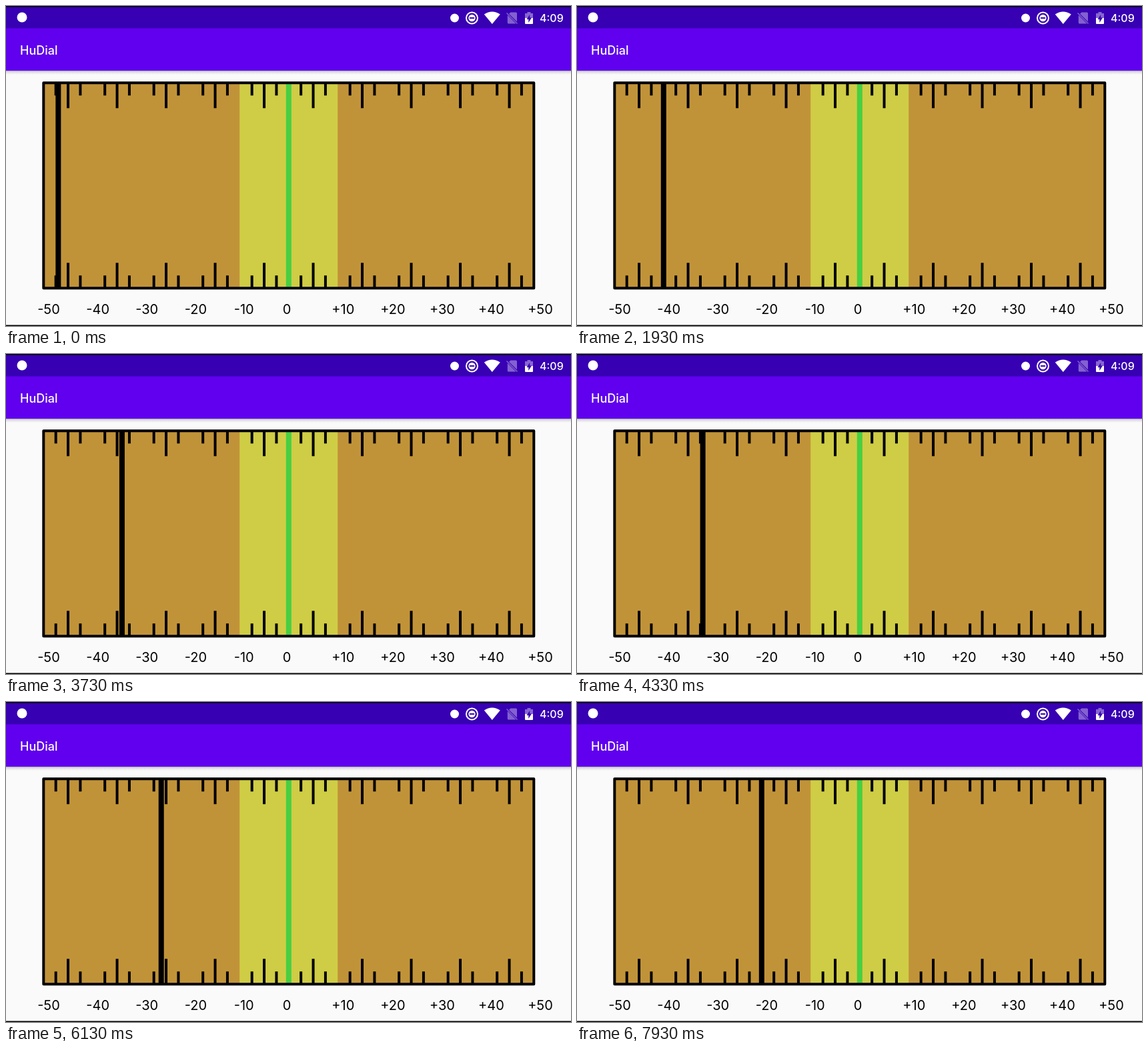
Recreate the animation shown at these times as an HTML page. Size 847 px wide and 480 px high, loop 8 s.

```html
<!DOCTYPE html>
<html lang="en">
<head>
<meta charset="utf-8">
<title>Gauge</title>
<style>
html, body { margin: 0; width: 100%; height: 100%; overflow: hidden; background: #fafafa; }
svg { display: block; width: 847px; height: 480px; }
text { font-family: Inter, sans-serif; }
.bar { font-weight: 500; fill: #fff; }
</style>
</head>
<body>
<svg viewBox="0 0 847 480">
  <defs>
    <linearGradient id="shadow" x2="0" y2="1">
      <stop stop-color="#b4b4b6"/>
      <stop offset=".4" stop-color="#e2e2e2"/>
      <stop offset="1" stop-color="#fafafa"/>
    </linearGradient>
  </defs>
  <rect width="847" height="480" fill="#fafafa"/>
  <rect y="97" width="847" height="6" fill="url(#shadow)"/>
  <rect y="33" width="847" height="64" fill="#6000ee"/>
  <rect width="847" height="33.5" fill="#3700b3"/>
  <path d="M0 .7H847M0 479.2H847" stroke="#000" stroke-width="1.6"/>

  <g fill="#fff">
    <circle cx="24" cy="17" r="7.5"/>
    <circle cx="672.5" cy="18" r="6.5"/>
    <circle cx="698.5" cy="18" r="8.5" fill="none" stroke="#fff" stroke-width="2"/>
    <path d="M698.5 12.8a5.2 5.2 0 0 1 0 10.4a5.2 5.2 0 0 1 0-10.4zM695 17v2h7v-2z" fill-rule="evenodd"/>
    <path d="M716.8 12.5Q728.7 4.5 740.8 12.5L728.8 27z"/>
    <g opacity=".38">
      <path d="M756.5 9.5H764.5a1.5 1.5 0 0 1 1.5 1.5V23.5L754 11.8zM751.8 13.8L764.5 26.5H753.3a1.5 1.5 0 0 1-1.5-1.5z"/>
      <path d="M750.5 10.5L766.5 26.5" stroke="#fff" stroke-width="1.5"/>
    </g>
    <path d="M781.5 9H786.5V11H790V18H778V11H781.5z" opacity=".4"/>
    <path d="M778 18H790V26a1 1 0 0 1-1 1H779a1 1 0 0 1-1-1z"/>
    <path d="M785.2 13L780.5 20H783.3V25L788 17.6H785.2z" fill="#3700b3"/>
  </g>
  <text class="bar" x="800" y="24" font-size="16">4:09</text>
  <text class="bar" x="21" y="73" font-size="18">HuDial</text>

  <rect x="56.3" y="115.3" width="735" height="308" fill="#c19339"/>
  <rect x="350.2" y="115.3" width="147" height="308" fill="#cfcd45"/>
  <rect x="419.8" y="115.3" width="8" height="308" fill="#47cf42"/>
  <path id="ticks" stroke="#000" stroke-width="4"/>
  <rect id="needle" y="116" width="8" height="307"/>
  <rect x="56.3" y="115.3" width="735" height="308" fill="none" stroke="#000" stroke-width="4" stroke-linejoin="round"/>
  <g id="labels" font-size="20" text-anchor="middle"></g>
</svg>
<script>
const LEFT = 56.3, UNIT = 7.35, LOOP = 8000;
const $ = id => document.getElementById(id);

let d = '';
for (let v = 0; v < 100; v += 2.5) {
  if (v % 10 === 0) continue;
  const len = v % 5 ? 19 : 38;
  d += `M${LEFT + v * UNIT} 115.3v${len}M${LEFT + v * UNIT} 423.3v${-len}`;
}
$('ticks').setAttribute('d', d);

const centers = [64, 137.7, 211.2, 284.5, 356.7, 421, 505.3, 580, 654, 727.5, 801];
$('labels').innerHTML = centers.map((x, i) => {
  const v = i * 10 - 50;
  return `<text x="${x}" y="462">${v > 0 ? '+' : ''}${v}</text>`;
}).join('');

// One unit per 300 ms; every eighth step comes 30 ms early.
function steps(t) {
  const s = t - 130;
  if (s < 0) return 0;
  const r = s % 2400;
  return 8 * Math.floor(s / 2400) + (r >= 2070 ? 8 : Math.floor(r / 300) + 1);
}

function draw() {
  const n = steps(performance.now() % LOOP);
  $('needle').setAttribute('x', LEFT + (3 + n) * UNIT - 4);
  requestAnimationFrame(draw);
}
draw();
</script>
</body>
</html>
```
